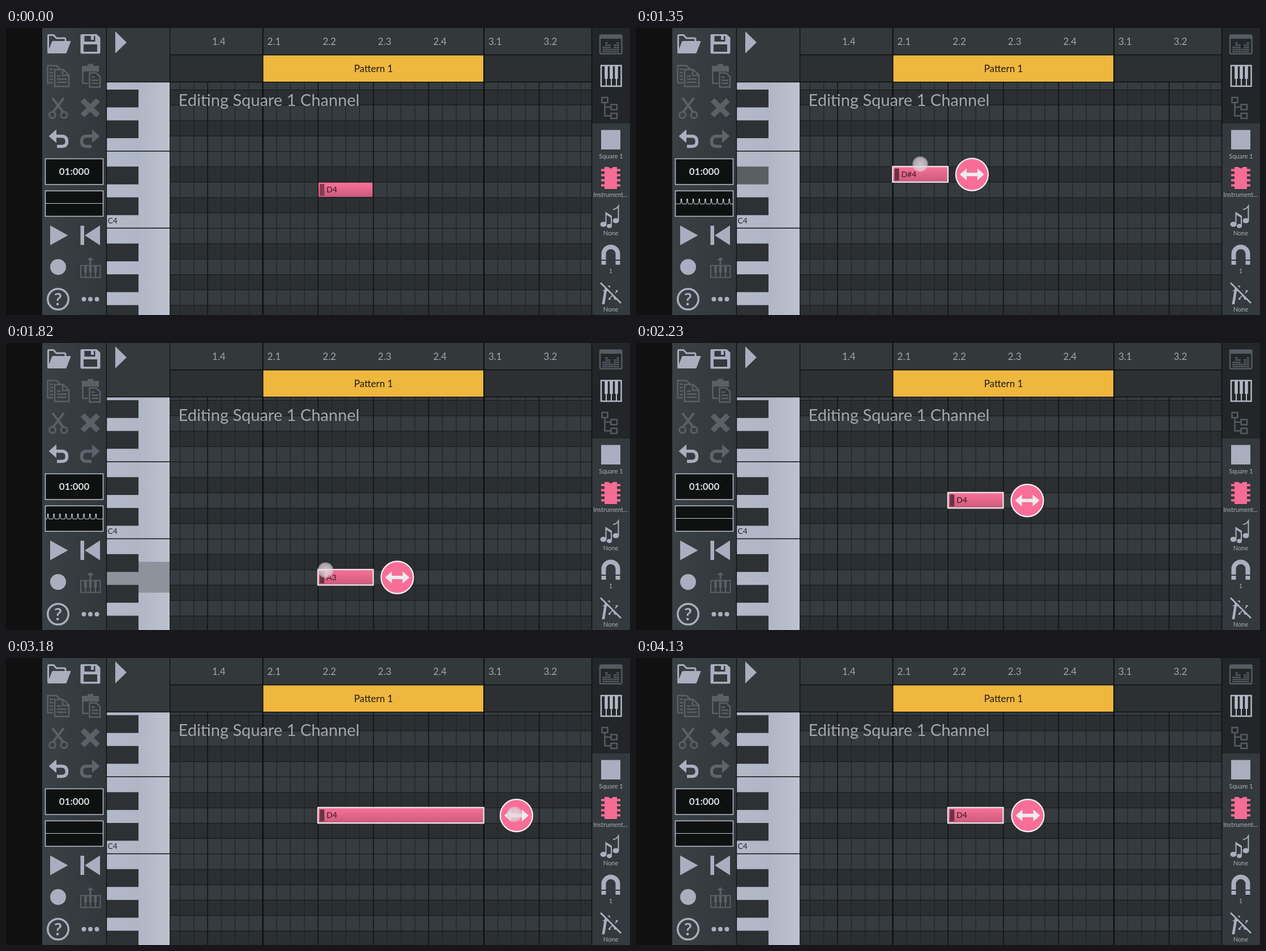
Write an HTML page that moves like this. It is 1102 px wide and 508 px high and loops after 4260 ms.

```html
<!DOCTYPE html>
<html lang="en">
<head>
<meta charset="utf-8">
<title>Piano roll</title>
<style>
  html, body { margin: 0; width: 100%; height: 100%; overflow: hidden; background: #101010; }
  svg { display: block; width: 1102px; height: 508px; }
  text { font-family: Lato, "Open Sans", sans-serif; }
  .on { fill: #a9afbe; }
  .off { fill: #5b6066; }
  .dim { fill: #555b63; }
  .line { fill: none; stroke: #a9afbe; }
  .offline { fill: none; stroke: #5b6066; }
  .label { font-size: 11px; fill: #a9afb9; text-anchor: middle; }
  .beat { font-size: 17px; fill: #a2a6ac; }
  .rule { stroke: #0e1011; }
  .screen { fill: #0f1010; stroke: #b4b9c4; stroke-width: 1.6; }
</style>
</head>
<body>
<svg viewBox="0 0 1102 508">
  <defs>
    <linearGradient id="noteFill" x2="0" y2="1">
      <stop offset="0" stop-color="#fa7299"/><stop offset="1" stop-color="#c95b7c"/>
    </linearGradient>
    <linearGradient id="keyFill">
      <stop offset="0" stop-color="#b3b9c9"/><stop offset=".5" stop-color="#b0b6c5"/><stop offset="1" stop-color="#bcc2cf"/>
    </linearGradient>
    <linearGradient id="barFill">
      <stop offset="0" stop-color="#3a4145"/><stop offset="1" stop-color="#31373a"/>
    </linearGradient>
    <radialGradient id="touchFill">
      <stop offset="0" stop-color="#e6dde1" stop-opacity=".85"/><stop offset=".8" stop-color="#dcd4d9" stop-opacity=".72"/>
      <stop offset="1" stop-color="#c8c4c8" stop-opacity=".4"/>
    </radialGradient>
    <clipPath id="roll"><rect x="178" y="96" width="856" height="412"/></clipPath>
    <clipPath id="grid"><rect x="290" y="96" width="744" height="412"/></clipPath>
  </defs>

  <rect width="1102" height="508" fill="#101010"/>
  <rect x="64" width="113" height="508" fill="url(#barFill)"/>

  <g clip-path="url(#roll)">
    <g id="scroll">
      <g id="rows"></g>
      <g id="keys"></g>
    </g>
    <g id="columns" clip-path="url(#grid)"></g>
    <path class="rule" d="M289.5 96V508"/>
  </g>

  <rect x="178" width="112" height="96" fill="#34393c"/>
  <rect x="290" width="744" height="47" fill="#33383b"/>
  <rect x="290" y="48" width="744" height="47" fill="#2c3033"/>
  <path class="rule" d="M177.5 0V508M289.5 0V96M290 47.5H1034M178 95.5H1034" stroke-width="1.3"/>
  <path class="rule" d="M453.6 0V96M844 0V96" stroke-width="2"/>
  <path class="on" d="M193 6L213 25.500L193 45Z"/>
  <g id="beats"></g>
  <rect x="454.500" y="48.500" width="388.500" height="46.500" fill="#efb73e"/>
  <text x="649" y="77.500" font-size="17" fill="#1d1a14" text-anchor="middle">Pattern 1</text>
  <text x="304.500" y="138" font-size="29" fill="#a3a7ac">Editing Square 1 Channel</text>

  <g id="note">
    <rect id="body" x=".5" y=".7" height="26" fill="url(#noteFill)"/>
    <rect id="grip" x="3" y="3.500" width="8" height="21" fill="#853a52"/>
    <text id="pitch" x="14.800" y="18.700" font-size="14" fill="#33171f"></text>
  </g>
  <g id="handle">
    <circle r="28.500" fill="#f96e98" stroke="#f3eef0" stroke-width="2.300"/>
    <path fill="#f0ebee" d="M-21.500 0L-9.500-10.500V-3H9.500V-10.500L21.500 0L9.500 10.500V3H-9.500V10.500Z"/>
  </g>
  <circle id="touch" r="14" fill="url(#touchFill)"/>

  <!-- left toolbar -->
  <path class="line" stroke-width="3" stroke-linejoin="round" d="M74.500 43V14Q74.500 12.500 76 12.500H84L89 18H103Q105 18 105 20V24"/>
  <path class="on" d="M73 45L81 24.500Q81.500 23 83 23H113Q115 23 114 25L107 43.500Q106.300 45 105 45Z"/>
  <path class="on" fill-rule="evenodd" d="M134 11H160L166.500 17V43Q166.500 45.500 164 45.500H134Q131.500 45.500 131.500 43V13.500Q131.500 11 134 11ZM138.500 14V24H157.500V14H155V21H150V14ZM137 29V42H161V29Z"/>
  <g class="offline" stroke-width="2.500">
    <path d="M83 97H73.500V66.500H89L97 74M86 73.500H101L111 83V103.500H86ZM100 74V84H111M90 85H97M90 90.500H107M90 96H107M77 73H83M77 79H83M77 85H83M77 91H83"/>
    <path d="M145 98H135.500V68.500H162.500V78M147.500 79.500H159L166 86V104.500H147.500ZM151 87H157M151 92.500H163M151 98H163"/>
    <path d="M82 124L101 149M102 124L83 149" stroke-width="4"/>
    <circle cx="82" cy="154" r="5.500" stroke-width="3"/><circle cx="102.500" cy="154" r="5.500" stroke-width="3"/>
    <path d="M135 127.500L162.500 155M162.500 127.500L135 155" stroke-width="9.500"/>
  </g>
  <path class="off" d="M134 67H164V77H134ZM144 63.500H154V70H144Z"/>
  <g id="undo">
    <path class="line" stroke-width="5.500" d="M84 191.500H99Q107.500 192 107.500 201Q107.500 209.500 98 209.500H90"/>
    <path class="on" d="M75.500 191.500L89 179.500V203.500Z"/>
  </g>
  <g opacity=".36">
    <path class="line" stroke-width="5.500" d="M157 191.500H142Q133.500 192 133.500 201Q133.500 209.500 143 209.500H151"/>
    <path class="on" d="M165.500 191.500L152 179.500V203.500Z"/>
  </g>
  <rect class="screen" x="69.500" y="231.500" width="102" height="45.500"/>
  <text x="120.500" y="260" font-size="17" font-weight="700" fill="#d5d9e0" text-anchor="middle">01:000</text>
  <rect class="screen" x="69.500" y="288.300" width="102" height="45"/>
  <path id="scope" fill="none" stroke="#c8ccd4" stroke-width="1.200"/>
  <path class="on" d="M78 349.500L109.500 367L78 384.500ZM131.500 350H138V384H131.500ZM166 349.500V384.500L139 367Z"/>
  <circle class="on" cx="92" cy="423" r="14"/>
  <path class="off" d="M147.500 411V419H150.500V411H155L149 405.500L143 411Z"/>
  <path class="offline" stroke-width="2" d="M132 420.500H166.500V441.500H132ZM140.500 431V441M149 431V441M158 431V441"/>
  <path class="offline" stroke-width="4.500" d="M140.500 421V433M149 421V433M158 421V433"/>
  <circle class="line" cx="92" cy="480" r="18.300" stroke-width="3.500"/>
  <text class="on" x="92" y="491" font-size="31" font-weight="700" text-anchor="middle">?</text>
  <g class="on"><circle cx="137.500" cy="480" r="4"/><circle cx="149" cy="480" r="4"/><circle cx="160.500" cy="480" r="4"/></g>

  <!-- right panel -->
  <rect x="1035" width="67" height="169" fill="#232628"/>
  <rect x="1035" y="169" width="67" height="339" fill="#33393c"/>
  <path class="rule" d="M1034.500 0V508" stroke-width="1.500"/>
  <rect x="1049" y="12.500" width="38.500" height="33" rx="2" fill="none" stroke="#555b63" stroke-width="2.500"/>
  <path class="dim" d="M1049 13H1087V19H1049Z"/>
  <path id="meter" fill="none" stroke="#555b63" stroke-width="4.500" stroke-dasharray="2.500 1.300"/>
  <rect x="1051" y="66.500" width="35.500" height="36.500" fill="none" stroke="#b4b9c6" stroke-width="2.500"/>
  <path stroke="#b4b9c6" stroke-width="2" d="M1060 67V103M1069 67V103M1078 67V103"/>
  <path stroke="#b4b9c6" stroke-width="5.500" d="M1060 66V90M1069 66V90M1078 66V90"/>
  <g fill="none" stroke="#555b63" stroke-width="2.500">
    <rect x="1052.500" y="123" width="10" height="9"/><rect x="1068.500" y="135.500" width="10.500" height="9"/><rect x="1068.500" y="151" width="10.500" height="9"/>
    <path d="M1057.500 132V155.500H1068M1057.500 140H1068"/>
  </g>
  <rect class="on" x="1051" y="180.500" width="34" height="34.500"/>
  <path fill="#f56c95" d="M1057 246H1064Q1068 251 1072 246H1079V285H1057Z"/>
  <path stroke="#f56c95" stroke-width="4" d="M1051 251.500H1085M1051 260.500H1085M1051 269.500H1085M1051 278.500H1085"/>
  <g class="on">
    <ellipse cx="1055" cy="347.500" rx="5.500" ry="4.500"/><ellipse cx="1065.500" cy="350.500" rx="4.500" ry="3.800"/><ellipse cx="1077" cy="341" rx="5.500" ry="4.500"/>
  </g>
  <path class="line" stroke-width="2" d="M1059.500 347V327L1069 333V350M1059.500 329L1069 335M1081.500 341V315Q1078 321 1072 321"/>
  <path class="line" stroke-width="8" d="M1055.500 419V400A12.500 12.500 0 0 1 1080.500 400V419"/>
  <path stroke="#33393c" stroke-width="2" d="M1050 411H1061M1075 411H1086"/>
  <text class="on" x="1067" y="481" font-size="35" font-style="italic" font-weight="700" text-anchor="middle" style="font-family:'Liberation Serif',serif">fx</text>
  <path stroke="#33393c" stroke-width="6" d="M1052 450L1087 485"/>
  <path class="line" stroke-width="3" d="M1050 451L1086 487"/>
  <g class="label">
    <text x="1068.500" y="231">Square 1</text><text x="1067.500" y="299">Instrument...</text>
    <text x="1068" y="367">None</text><text x="1068" y="434">1</text><text x="1068" y="502">None</text>
  </g>
</svg>

<script>
const LOOP = 4260, BEAT = 97.6, ROW = 27.25, BAR = 453.6, C4 = 327, HOME = 691, LAG = 70;
const NAMES = ['C', 'C#', 'D', 'D#', 'E', 'F', 'F#', 'G', 'G#', 'A', 'A#', 'B'];
const $ = id => document.getElementById(id);
const put = (el, attrs) => { for (const k in attrs) el.setAttribute(k, attrs[k]); return el; };
const add = (parent, tag, attrs) =>
  parent.appendChild(put(document.createElementNS('http://www.w3.org/2000/svg', tag), attrs));

// Semitones count up from C4
const semi = n => (n % 12 + 12) % 12;
const isBlack = n => NAMES[semi(n)].length > 1;
const rowTop = n => C4 - n * ROW;
const pitchName = n => NAMES[semi(n)] + (4 + Math.floor(n / 12));

const keyEls = {};
function buildRoll() {
  const rows = $('rows'), keys = $('keys');
  add(keys, 'rect', { x: 178, y: 60, width: 111, height: 500, fill: 'url(#keyFill)' });
  const range = [];
  for (let n = -8; n <= 9; n++) range.push(n);
  for (const n of range) {
    const y = rowTop(n);
    add(rows, 'rect', { x: 290, y, width: 744, height: ROW, fill: isBlack(n) ? '#2b2f32' : '#353b3e' });
    add(rows, 'path', { d: `M290 ${y}H1034`, class: 'rule', 'stroke-width': 1.6 });
    if (!isBlack(n)) {
      const top = y - (isBlack(n + 1) ? ROW / 2 : 0);
      const bottom = y + ROW * (isBlack(n - 1) ? 1.5 : 1);
      keyEls[n] = add(keys, 'rect', { x: 178, y: top, width: 111, height: bottom - top, fill: '#8d929b' });
    }
  }
  for (const n of range) {
    const y = rowTop(n);
    if (isBlack(n)) keyEls[n] = add(keys, 'rect', { x: 178, y, width: 56, height: 31.5 });
    if (semi(n) === 0 || semi(n) === 5)
      add(keys, 'path', { d: `M178 ${y + ROW}H290`, class: 'rule', 'stroke-width': 1.6 });
  }
  add(keys, 'text', { x: 179.5, y: 346, 'font-size': 14, fill: '#25282c' }).textContent = 'C4';
  for (let i = -6; i < 24; i++) {
    const x = BAR + i * BEAT / 4, style = i % 16 === 0 ? ['#0a0b0c', 2.2] : i % 4 === 0 ? ['#101214', 1.5] : ['#1f2426', 1.2];
    add($('columns'), 'path', { d: `M${x} 96V508`, stroke: style[0], 'stroke-width': style[1] });
  }
  for (let i = 3; i < 10; i++) {
    const label = add($('beats'), 'text', { class: 'beat', x: BAR + (i - 4) * BEAT + 8, y: 30 });
    label.textContent = `${1 + Math.floor(i / 4)}.${1 + i % 4}`;
  }
  put($('meter'), { d: [3, 5, 4, 2, 4, 5].map((h, i) => `M${1055.5 + i * 5} 43v${-h * 3.8}`).join('') });
}

// Finger strokes: [time, x, y]; each ends when lifted
const strokes = [
  { end: 410, path: [[200, 601, 288]] },
  { end: 2230, path: [[940, 601, 288], [1010, 592, 285], [1280, 508, 247], [1350, 502, 241], [1480, 502, 241],
    [1550, 502, 243], [1745, 502, 243], [1750, 520, 300], [1820, 564, 402], [1890, 588, 402], [1990, 600, 370], [2150, 601, 284], [2230, 601, 281]] },
  { end: 4130, path: [[2300, 691, 279], [2440, 715, 278], [2640, 795, 275], [2770, 835, 274], [2895, 835, 274], [2900, 875, 274],
    [2970, 892, 275], [3100, 902, 276], [3240, 895, 277], [3380, 815, 278], [3450, 779, 278], [3520, 766, 278], [3640, 766, 278],
    [3790, 732, 279], [3920, 704, 279], [3990, 692, 279]] }
];
// Snapped note places: [time, beat, semitone]
const places = [[0, 1, 2], [1150, 0, 2], [1280, 0, 3], [1750, 0, 1], [1820, 1, -3], [1960, 1, -1], [2020, 1, 0], [2090, 1, 2]];
const sounds = [[270, 470], [1010, 1480], [1750, 2230]];

function along(path, t) {
  if (t <= path[0][0]) return path[0].slice(1);
  const i = path.findIndex(p => p[0] > t);
  if (i < 0) return path[path.length - 1].slice(1);
  const a = path[i - 1], b = path[i], u = (t - a[0]) / (b[0] - a[0]);
  return [a[1] + (b[1] - a[1]) * u, a[2] + (b[2] - a[2]) * u];
}

function scopePath(t, live) {
  if (!live) return 'M70 310.500H171';
  const step = 10.6, shift = Math.floor(t / 70) * 3.7 % step;
  let d = 'M70 311';
  for (let x = 71 + shift; x < 167; x += step)
    d += `L${x} 311.500Q${x + 1.5} 311 ${x + 1.8} 302.500H${x + 2.8}Q${x + 3} 311 ${x + 4.5} 311.500`;
  return d + 'H171';
}

function draw(t) {
  const [, beat, n] = places.filter(p => p[0] <= t).pop();
  const scroll = t < 1820 ? 0 : -7.8;
  const selected = t >= 200;
  const live = sounds.some(([a, b]) => t >= a && t < b);
  const x = BAR + beat * BEAT, y = rowTop(n) + scroll;

  const resizing = t >= 2300;
  const pull = resizing ? along(strokes[2].path, t - LAG)[0] : HOME;
  const beats = 1 + Math.max(0, Math.round((pull - HOME) / BEAT));
  const width = beats * BEAT;
  const handleX = resizing ? pull : x + width + 42.2;

  put($('scroll'), { transform: `translate(0 ${scroll})` });
  for (const k in keyEls) {
    const held = live && +k === n;
    if (isBlack(+k)) put(keyEls[k], { fill: held ? '#5c5e62' : '#2d3134' });
    else put(keyEls[k], { opacity: held ? 1 : 0 });
  }
  put($('note'), { transform: `translate(${x} ${y})` });
  put($('body'), {
    x: selected ? -.3 : .5, y: selected ? 0 : .7, width: width - (selected ? 0 : 1.5), height: selected ? 27.5 : 26,
    stroke: selected ? '#efeaec' : '#24181c', 'stroke-width': selected ? 2.2 : .6
  });
  put($('grip'), { fill: selected ? '#693245' : '#853a52' });
  $('pitch').textContent = pitchName(n);
  const grow = Math.min(1, Math.max(0, (t - 200) / 140));
  put($('handle'), { transform: `translate(${handleX} ${y + ROW / 2 + .4}) scale(${grow})` });

  const stroke = strokes.find(s => t >= s.path[0][0] && t < s.end);
  const [tx, ty] = stroke ? along(stroke.path, t) : [0, 0];
  put($('touch'), { cx: tx, cy: ty, visibility: stroke ? 'visible' : 'hidden' });
  put($('scope'), { d: scopePath(t, live) });
}

buildRoll();
const start = performance.now();
function tick() {
  draw((performance.now() - start) % LOOP);
  requestAnimationFrame(tick);
}
tick();
</script>
</body>
</html>
```
